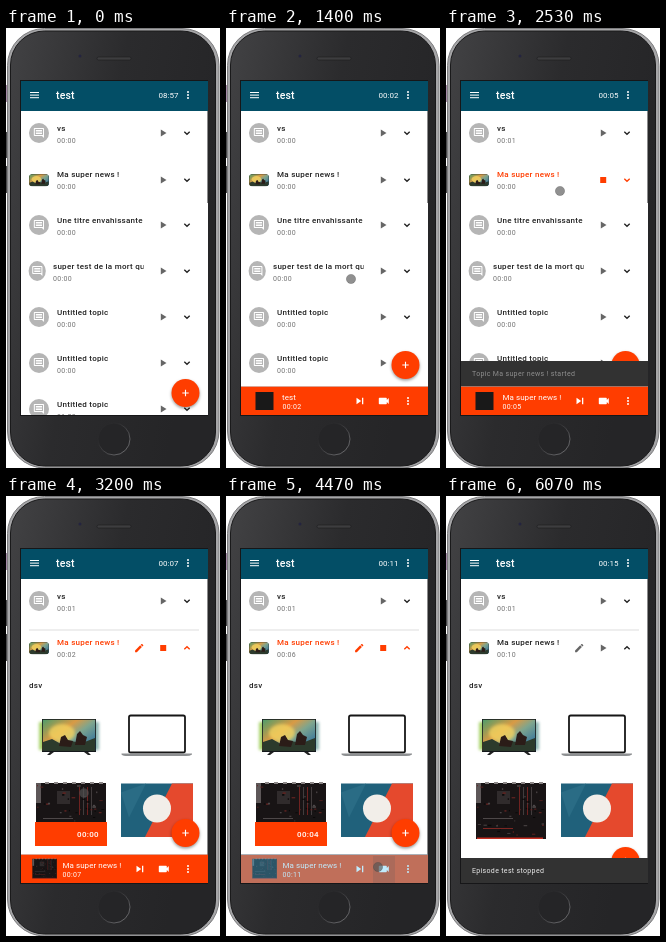
Animation of 214x440 px, one loop 6.4 s. Source, as an HTML page:

```html
<!DOCTYPE html>
<html lang="en">
<head>
<meta charset="utf-8">
<title>Episode player</title>
<style>
html, body { margin: 0; width: 100%; height: 100%; overflow: hidden; background: #fff; }
svg { display: block; width: 100%; height: 100%; }
text { font: 7px Roboto, sans-serif; letter-spacing: .33px; white-space: pre; }
.title { font-size: 8px; font-weight: 500; letter-spacing: .27px; fill: #212121; }
.time { fill: #707070; }
.accent { fill: #ff3d00; }
.light { fill: #fff; }
.now { font-size: 8px; letter-spacing: .05px; }
.head { font-size: 10.5px; font-weight: 500; letter-spacing: .15px; }
.clock { font-size: 8px; letter-spacing: 0; }
.count { font-size: 8px; font-weight: 500; }
.chevron { fill: none; stroke: #212121; stroke-width: 1.3; }
.chevron.accent { stroke: #ff3d00; fill: none; }
.grey { fill: #666; }
.anim { animation: 6.4s linear infinite; }
.cursor { animation-name: cursor; }
.fab { animation-name: fab; }
.bar { animation-name: bar; }
.snack { animation-name: snack; }
.fade { animation-name: fade; }
.rest { animation-name: rest; }

@keyframes fab {
  0%, 9.7%, 92.7%, 100% { transform: translateY(28px); }
  10.9%, 91.5% { transform: none; }
}
@keyframes bar {
  0%, 9.7%, 92.7%, 100% { transform: translateY(32px); }
  10.9%, 91.5% { transform: none; }
}
@keyframes snack {
  0%, 9.8%, 91.7%, 100% { transform: translateY(58px); }
  10.9%, 16% { transform: none; }
  17%, 25.8% { transform: translateY(30px); }
  26.8%, 31.6% { transform: none; }
  32.5%, 34.6% { transform: translateY(30px); }
  35.6%, 40.2% { transform: none; }
  41.2%, 91.6% { transform: translateY(30px); }
  92.8%, 99.9% { transform: translateY(29px); }
}
@keyframes fade {
  0%, 38.9%, 42%, 100% { opacity: 1; }
  40.2%, 41.5% { opacity: 0; }
}
@keyframes rest {
  0%, 43.75% { transform: none; animation-timing-function: ease-in-out; }
  45.2%, 100% { transform: translateY(240px); }
}
@keyframes cursor {
  0%, 5% { transform: translate(180px, 130px); opacity: 0; }
  6% { transform: translate(180px, 120px); opacity: 1; }
  8.8%, 10.5% { transform: translate(182px, 68px); }
  18% { transform: translate(138px, 225px); }
  21.5%, 22.4% { transform: translate(125px, 251px); }
  25%, 27% { transform: translate(157px, 106px); }
  33.5%, 35% { transform: translate(157px, 152px); }
  39%, 40% { transform: translate(114px, 163px); }
  43%, 44% { transform: translate(181px, 153px); }
  46.5%, 51% { transform: translate(78px, 297px); }
  65.6% { transform: translate(157px, 373px); }
  69.4%, 70.4% { transform: translate(152px, 371px); }
  75% { transform: translate(157px, 373px); }
  82.8%, 84% { transform: translate(160px, 342px); }
  90%, 92% { transform: translate(182px, 68px); opacity: 1; }
  93%, 100% { transform: translate(182px, 68px); opacity: 0; }
}
</style>
</head>
<body>
<svg id="stage" viewBox="0 0 214 440"></svg>
<script>
const LOOP = 6400, SECOND = 345;
const START = 620, FIRST = 1640, NEWS = 2205, OPEN = 2800, MEDIA = 3000, STOP = 5860;

const text = (x, y, cls, str, extra = '') =>
  `<text x="${x}" y="${y}" class="${cls}" ${extra}>${str}</text>`;
const rect = (x, y, w, h, fill, extra = '') =>
  `<rect x="${x}" y="${y}" width="${w}" height="${h}" fill="${fill}" ${extra}/>`;
const at = (x, y, body, scale = 1) =>
  `<g transform="translate(${x} ${y}) scale(${scale})">${body}</g>`;
// Shown only between two times of the loop.
const during = (from, to, body) => `<g data-from="${from}" data-to="${to}">${body}</g>`;
const outside = (from, to, body) => during(0, from, body) + during(to, LOOP, body);

const play = y => at(157.4, y, '<path class="grey" d="M-2.6-3.6v7.2l5.7-3.6z"/>');
const stop = y => rect(154.2, y - 3, 6, 6, '#ff3d00');
const chevron = (y, cls = '', dir = 1) =>
  at(181, y, `<path class="chevron ${cls}" d="M-2.7 ${-1.3 * dir}L0 ${1.3 * dir}L2.7 ${-1.3 * dir}"/>`);
const pencil = cls => at(127.7, 146.5, `<path class="${cls}" d="M3 17.2V21h3.8L17.8 9.9l-3.7-3.7zM20.7 7c.4-.4.4-1 0-1.4l-2.3-2.3c-.4-.4-1-.4-1.4 0l-1.8 1.8 3.7 3.7z"/>`, .46);
const dots = y => [-3, 0, 3].map(d => `<circle cx="182" cy="${y + d}" r="1" fill="#fff"/>`).join('');

function avatar(y, narrow) {
  const bubble = '<path fill="#fff" fill-rule="evenodd" d="M22 4c0-1.1-.9-2-2-2H4c-1.1 0-2 .9-2 2v12c0 1.1.9 2 2 2h14l4 4zM20 16H4V4h16z"/><path fill="#fff" d="M6 12h12v2H6zM6 9h12v2H6zM6 6h12v2H6z"/>';
  return `<ellipse cx="${narrow ? 31.2 : 33}" cy="${y}" rx="${narrow ? 8.6 : 10}" ry="10" fill="#b5b5b5"/>` +
    at(narrow ? 25.2 : 26.8, y - 6.1, bubble, .51);
}

function row(index, title, { time = '00:00', narrow = false } = {}) {
  const y = 105 + 46 * index, x = narrow ? 47 : 51;
  return avatar(y, narrow) +
    `<g clip-path="url(#titles)">${text(x, y - 2, 'title', title)}</g>` +
    text(x, y + 9.8, 'time', time) + play(y) + chevron(y);
}

function circuitBoard() {
  let seed = 11;
  const rand = n => (seed = seed * 16807 % 2147483647) / 2147483647 * n;
  let out = rect(1, 1, 70, 56, '#181415') + rect(1, 1, 5, 20, '#5d5758') + rect(22, 9, 13, 13, '#302b2c');
  for (let x = 10; x < 70; x += 9) out += rect(x, 0, 4, 2, '#8c8787');
  for (let x = 44; x < 60; x += 4) out += rect(x, 5, 1, 28, x % 8 ? '#6e2220' : '#423c3d');
  for (let i = 0; i < 50; i++) {
    out += rect(2 + rand(65), 2 + rand(51), .7 + rand(3), .7 + rand(1), ['#5f2220', '#4d4748', '#0a0808'][i % 3]);
  }
  return out + rect(8, 36, 30, 1, '#4d4748') + rect(8, 46, 30, 1, '#7d2723') + rect(2, 55.5, 66, 1.5, '#c42e22');
}

const television =
  rect(-3, 3, 6, 28, '#a9d36a', 'filter="url(#soft)"') + rect(51, 3, 6, 28, '#8fb7b4', 'filter="url(#soft)"') +
  rect(0, 0, 54, 33, '#15181b') + rect(.8, .8, 52.4, 31, 'url(#sky)') +
  '<ellipse cx="20" cy="14" rx="13" ry="9" fill="#f6d661" opacity=".75" filter="url(#soft)"/>' +
  '<path fill="#2c3a2c" d="M1 32V23l9-3 9 5 10-3 11 2 13-5v13z"/>' +
  '<path fill="#2b1c18" d="M17 27l2-9 4-2 3 5 5 1-2 6zM33 26l2-11 3-3 3 4 4 2-2 8z"/>' +
  '<path fill="#222" d="M8 33l-3 3h3l4-3zM46 33l3 3h-3l-4-3z"/>';

const poster = rect(0, 0, 72, 53.5, '#20617b') +
  '<path fill="#e5492d" d="M51 0H72V53.5H24z"/><path fill="#2a6c85" d="M0 9L25 0 8 34z"/>' +
  '<circle cx="36" cy="25" r="14" fill="#f2eee9"/>';

const laptop = rect(123, 219.5, 56, 37, '#fff', 'rx="1.8" stroke="#161616" stroke-width="1.8"') +
  '<path fill="#8d8f91" d="M115.5 257.4h70.5v1q-2 1.6-6 1.6h-58q-5 0-6.500-1.600z"/>';

const newsRow =
  '<g clip-path="url(#thumb)"><svg x="23" y="146" width="20" height="12.500" viewBox="0 0 54 33" preserveAspectRatio="none"><use href="#tv"/></svg></g>' +
  text(51, 160.8, 'time', '', 'id="newsTime"') +
  outside(NEWS, STOP, text(51, 149, 'title', 'Ma super news !') + play(152)) +
  during(NEWS, STOP, text(51, 149, 'title accent', 'Ma super news !') + stop(152)) +
  during(0, NEWS, chevron(152)) + during(NEWS, OPEN, chevron(152, 'accent')) +
  during(OPEN, STOP, pencil('accent') + chevron(152, 'accent', -1)) +
  during(STOP, LOOP, pencil('grey') + chevron(152, '', -1));

const panel = rect(23, 133.5, 170, 1, '#ddd') + text(23, 191.5, 'title', 'dsv') +
  at(36, 223, '<use href="#tv"/>') + laptop + at(29, 286, '<use href="#board"/>') +
  at(115, 287.5, '<use href="#poster"/>') +
  during(MEDIA, STOP, rect(29, 326, 72, 24, '#ff3d00') +
    text(93, 341, 'light count', '', 'id="mediaTime" text-anchor="end"'));

const rest = rect(14, 175, 188, 280, '#fff') + row(2, 'Une titre envahissante') +
  row(3, 'super test de la mort qui', { narrow: true }) +
  row(4, 'Untitled topic') + row(5, 'Untitled topic') + row(6, 'Untitled topic', { time: '01:50' });

const firstRow = avatar(105) + text(51, 114.8, 'time', '', 'id="firstTime"') +
  outside(FIRST, NEWS, text(51, 103, 'title', 'vs') + play(105) + chevron(105)) +
  during(FIRST, NEWS, text(51, 103, 'title accent', 'vs') + stop(105) + chevron(105, 'accent'));

const header = rect(14, 53, 188, 30, '#034e66') +
  [64, 66.6, 69.2].map(y => rect(24, y, 9, 1, '#fff')).join('') +
  text(50, 71, 'light head', 'test') + text(152.5, 70, 'light clock', '', 'id="clock"') + dots(67);

const fab = '<circle cx="179.5" cy="338.5" r="14" fill="#0006" filter="url(#soft)"/>' +
  '<circle cx="179.5" cy="337" r="14" fill="#ff3d00"/>' +
  '<path d="M176.300 337h6.400M179.500 333.800v6.400" stroke="#fff" stroke-width="1.1"/>';

const message = (from, to, str) => during(from, to, text(26, 348, 'light', str, 'fill-opacity=".9"'));
const snack = rect(14, 333, 188, 25.5, '#323232') + '<g class="anim fade">' +
  message(START, 1300, 'Episode test started') + message(FIRST, 2150, 'Topic vs started') +
  message(NEWS, 2800, 'Topic Ma super news ! started') + message(STOP, LOOP, 'Episode test stopped') + '</g>';

const bar = rect(14, 359, 188, 29, '#ff3d00') + rect(14, 358, 188, 1, '#b94a2b', 'opacity=".5"') +
  during(4400, LOOP, rect(147, 360, 22, 27, '#0002')) +
  during(0, MEDIA, rect(29.5, 364, 18, 18, '#191919')) +
  during(MEDIA, LOOP, at(26, 362.5, '<use href="#board"/>', .35)) +
  during(0, FIRST, text(56, 371.5, 'light now', 'test')) +
  during(FIRST, NEWS, text(56, 371.5, 'light now', 'vs')) +
  during(NEWS, LOOP, text(56.5, 371.5, 'light now', 'Ma super news !')) +
  text(56.5, 381, 'light', '', 'id="barTime"') +
  '<path fill="#fff" d="M130.500 369.700v6.600l4.700-3.300zM136 369.700h1.300v6.600H136z"/>' +
  '<path fill="#fff" d="M153.500 369.700h6.600q.7 0 .7.7v1.600l2-2v6l-2-2v1.600q0 .7-.7.7h-6.600q-.7 0-.7-.7v-5.200q0-.7.7-.7z"/>' +
  dots(373) +
  // Touch highlight over the whole bar.
  during(4400, 4600, rect(14, 358, 188, 30, '#50c8fa', 'opacity=".36"'));

const phone = rect(0, 57, 3, 17, '#a58aa6') + rect(0, 104, 3, 26, '#4a4a4c') + rect(0, 138, 3, 27, '#4a4a4c') +
  rect(1.5, .5, 211.5, 439.5, '#a6a6a8', 'rx="37" stroke="#7c7c7e"') +
  rect(4.5, 3, 205, 435, 'url(#glass)', 'rx="34" stroke="#1a1a1b"') +
  '<circle cx="74" cy="28" r="1.500" fill="#24243f"/>' +
  rect(91, 29, 34, 3, '#3d3d3f', 'rx="1.5" stroke="#1b1b1d" stroke-width=".6"') +
  '<circle cx="108" cy="411" r="16" fill="#252527" stroke="url(#ring)"/>' +
  rect(14, 52, 188, 336, '#161618');

const stage = document.getElementById('stage');
stage.innerHTML = `<defs>
  <clipPath id="screen"><rect x="15" y="53" width="186.5" height="334"/></clipPath>
  <clipPath id="titles"><rect x="45" y="80" width="92.5" height="330"/></clipPath>
  <clipPath id="thumb"><rect x="23" y="146" width="20" height="12.5" rx="4"/></clipPath>
  <filter id="soft" x="-50%" y="-50%" width="200%" height="200%"><feGaussianBlur stdDeviation="1.6"/></filter>
  <linearGradient id="sky" y2=".8"><stop stop-color="#4e9c6a"/><stop offset=".4" stop-color="#d99a45"/><stop offset=".62" stop-color="#7fa58d"/><stop offset="1" stop-color="#2c6fa0"/></linearGradient>
  <linearGradient id="glass" y2=".4"><stop stop-color="#424244"/><stop offset=".5" stop-color="#2b2b2d"/><stop offset="1" stop-color="#252527"/></linearGradient>
  <linearGradient id="ring" y2="1"><stop offset=".3" stop-color="#2a2a2c"/><stop offset="1" stop-color="#77777a"/></linearGradient>
  <g id="tv">${television}</g><g id="board">${circuitBoard()}</g><g id="poster">${poster}</g>
</defs>${phone}
<g clip-path="url(#screen)">${rect(14, 53, 188, 335, '#fff')}
  ${firstRow}${newsRow}${during(OPEN, LOOP, panel)}
  <g class="anim rest">${rest}</g>${header}
  <g class="anim fab">${fab}</g><g class="anim snack">${snack}</g><g class="anim bar">${bar}</g>
  <g class="anim cursor"><circle r="4.6" fill="#555" fill-opacity=".65" stroke="#444" stroke-opacity=".4" stroke-width=".8"/></g>
</g>`;

const windows = [...stage.querySelectorAll('[data-from]')];
const set = (id, value) => { document.getElementById(id).textContent = value; };
const count = (t, from, to = STOP) => {
  const s = Math.max(0, Math.floor((Math.min(t, to) - from) / SECOND));
  return '00:' + String(s).padStart(2, '0');
};

let origin;
function draw(now) {
  origin ??= now;
  const t = (now - origin) % LOOP;
  for (const el of windows) {
    el.style.display = t >= +el.dataset.from && t < +el.dataset.to ? '' : 'none';
  }
  set('clock', t < START ? '08:57' : count(t, START));
  set('barTime', count(t, START));
  set('firstTime', count(t, FIRST, NEWS));
  set('newsTime', count(t, NEWS));
  set('mediaTime', count(t, MEDIA));
  requestAnimationFrame(draw);
}
requestAnimationFrame(draw);
</script>
</body>
</html>
```
